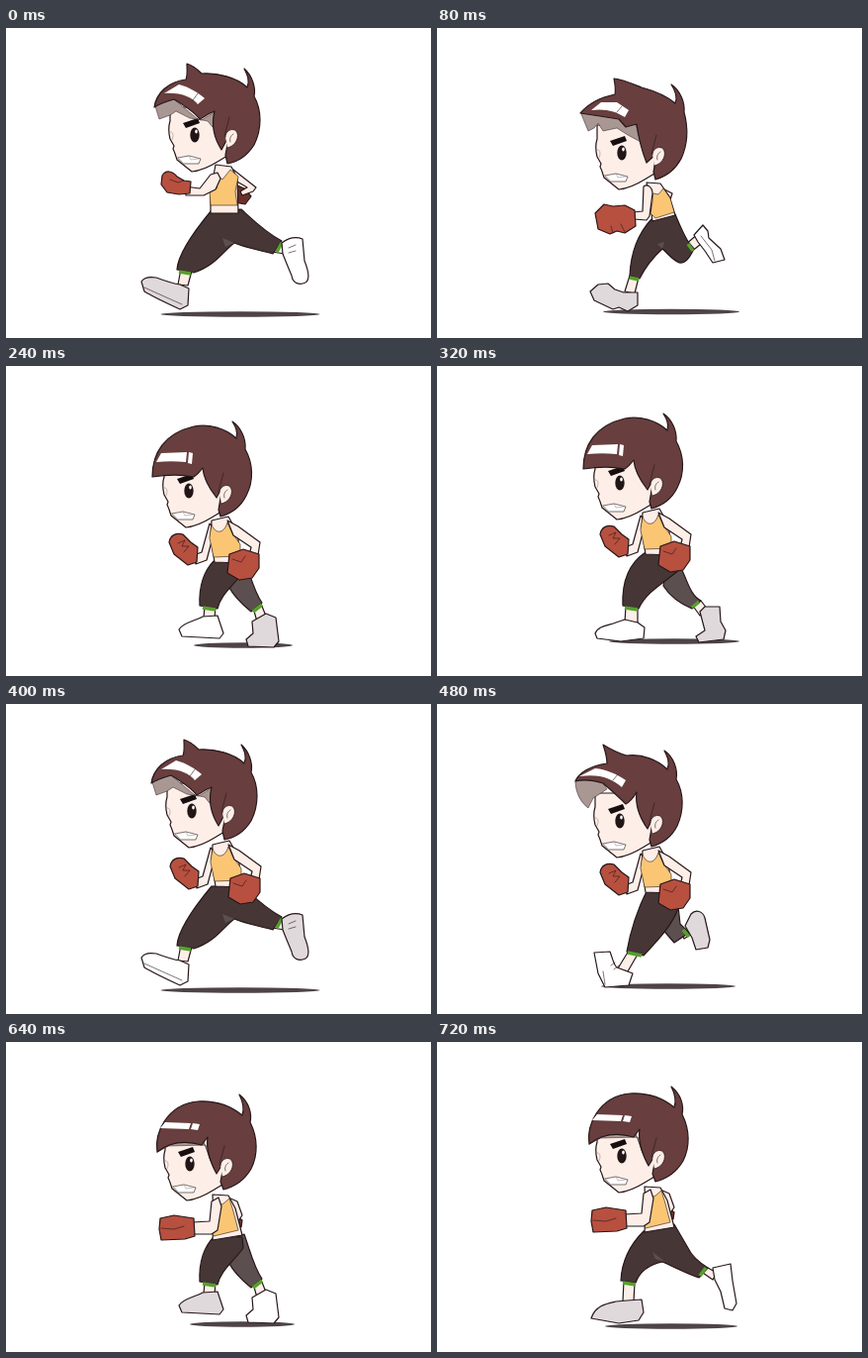
These frames come from a looping animation (430 px wide and 313 px high, 800 ms). An HTML page without scripts:

```html
<!DOCTYPE html>
<html lang="en">
<head>
<meta charset="utf-8">
<title>Running boxer</title>
<style>
html, body { margin: 0; width: 100%; height: 100%; overflow: hidden; background: #fff; }
svg { display: block; width: 100vw; height: 100vh; stroke: #27171a; stroke-width: 1.2; stroke-linejoin: round; stroke-linecap: round; }
.skin { fill: #fdefe8; }
.hair { fill: #683e3e; }
.under { fill: #a99793; stroke-width: .5; }
.band { fill: #fff; stroke: none; }
.top { fill: #fbc674; stroke-width: .6; }
.glove { fill: #b7503f; }
.shade { fill: #6b3029; }
.pants { fill: #463736; }
.dim { fill: #5c4f4f; }
.sock { fill: none; stroke: #57a02c; stroke-width: 3.5; stroke-linecap: butt; }
.near { fill: var(--near, #fff); }
.far { fill: var(--far, #e0d9dc); }
.line { fill: none; stroke-width: .6; }
.shadow { fill: #4e4448; stroke: none; }
.pose { visibility: hidden; animation: show 800ms step-end infinite; animation-delay: calc(var(--i) * 80ms - 800ms); }
.swap { --near: #e0d9dc; --far: #fff; }
@keyframes show {
  0% { visibility: visible; }
  10%, 100% { visibility: hidden; }
}
</style>
</head>
<body>
<svg viewBox="0 0 430 313">
<defs>
  <!-- Face parts, centred on the eye -->
  <g id="face">
    <path class="skin" d="M-25-28L-25-14C-27-8-26 0-25 4L-21 11L-22 14C-20 18-19 22-18 25L-3 37C7 36 15 32 23 27L33 21L34-28Z"/>
    <path class="line" d="M-25-3C-22-4-21 1-23 5" stroke="#9b8886"/>
    <ellipse rx="4.700" ry="7.600" fill="#211516" stroke="none"/>
    <ellipse cx="1.500" cy="-3.500" rx="1.300" ry="2" fill="#fff" stroke="none"/>
    <path d="M-12-12L3-17L5-12L-9-7Z" fill="#160e0f" stroke="none"/>
    <path d="M-17 23L-6 21L6 24L4 29L-11 29Z" fill="#fff" stroke-width=".6"/>
    <path class="line" d="M-6 21L-4 25L4 24" stroke="#9f9293"/>
  </g>
  <g id="ear">
    <path class="skin" d="M31 2C31-6 41-8 43-2C45 5 39 12 33 13" stroke-width=".8"/>
    <path class="line" d="M39-1C36 1 35 4 36 7M30 1L35-18"/>
  </g>

  <!-- Heads -->
  <g id="head-flap">
    <use href="#face" x="191" y="108"/>
    <path class="under" d="M151 79L155 92L166 88L172 84L186 91L198 93L212 84L209 100L204 94L194 92L170 72Z"/>
    <path class="hair" d="M150 80C152 66 164 54 182 52C184 47 183 42 183 36C190 38 194 42 198 46C214 45 234 50 244 60C247 53 244 47 241 41C249 48 253 60 251 69C259 83 259 102 251 118C244 129 236 135 224 137L222 128L226 108L218 123C211 112 207 100 211 84C203 87 199 91 196 92C190 84 180 78 170 72C163 74 156 76 150 80Z"/>
    <path class="band" d="M160 66L175 57C186 60 194 65 201 71L194 77C188 70 178 65 160 66Z"/>
    <path class="line" d="M194 66L189 73"/>
    <use href="#ear" x="191" y="108"/>
  </g>
  <g id="head-drop">
    <use href="#face" x="187" y="126"/>
    <path class="under" d="M146 87L153 104L159 101L163 96L168 104L182 101L193 108L206 115L200 94L160 86Z"/>
    <path class="hair" d="M145 86C154 75 166 70 180 67C181 62 180 56 179 51C188 52 197 56 207 60C222 64 234 70 241 76C244 69 241 63 237 57C246 63 251 75 250 85C254 100 254 117 247 132C241 143 232 150 221 153L219 145L223 126L212 136C208 126 204 112 202 97L191 100L184 92L165 89Z"/>
    <path class="band" d="M156 83L166 75L182 75L194 83L190 90C181 84 170 81 156 83Z"/>
    <path class="line" d="M187 79L182 85"/>
    <use href="#ear" x="187" y="126"/>
  </g>
  <g id="head-low">
    <use href="#face" x="185" y="135"/>
    <path class="under" d="M143 99L146 109L153 119L161 119L166 110L180 117L207 124L209 112L180 104Z"/>
    <path class="hair" d="M143 98C149 96 155 96 159 94L165 87C159 82 160 75 158 70C164 74 168 74 173 73C190 68 214 69 230 81C234 73 230 65 226 59C235 66 240 78 240 90C249 102 250 122 244 138C239 148 231 155 221 158L217 149L221 134L211 145C207 136 205 127 204 117C198 115 194 112 191 110C184 115 176 114 168 110L160 104L152 101Z"/>
    <path class="band" d="M155 97C163 95 170 101 188 99L185 104C178 106 172 110 165 104Z"/>
    <use href="#ear" x="185" y="135"/>
  </g>
  <g id="head-smooth">
    <use href="#face" x="185" y="118"/>
    <path class="hair" d="M148 104C148 80 160 60 190 53C206 50 222 55 233 65C235 58 232 53 229 48C238 54 243 66 242 76C250 90 251 108 243 123C237 135 228 141 217 144L215 137L219 114L213 125C206 116 200 107 199 95C196 99 193 102 190 104C176 101 160 102 148 104Z"/>
    <path class="band" d="M152 89L157 80L183 79L182 89C172 88 162 88 152 89ZM185 79L189 80L188 91L184 90Z"/>
    <use href="#ear" x="185" y="118"/>
  </g>
  <g id="head-lift">
    <use href="#face" x="185" y="118"/>
    <path class="under" d="M140 78C140 90 146 100 153 105L158 95L172 86L166 77Z"/>
    <path class="hair" d="M140 78C143 70 155 62 172 60C172 53 170 47 168 41C176 46 184 50 192 52C208 50 224 57 233 66C236 59 233 53 230 47C239 53 244 66 242 76C250 90 250 108 243 123C237 135 228 141 217 144L215 137L219 114L213 126C206 116 200 104 202 89C199 94 195 99 191 101C185 95 175 86 168 80C158 77 148 76 140 78Z"/>
    <path class="band" d="M144 73L160 65C172 66 182 71 191 77L187 84C177 75 164 70 144 73Z"/>
    <path class="line" d="M183 71L178 77"/>
    <use href="#ear" x="185" y="118"/>
  </g>
  <g id="head-round">
    <use href="#face" x="187" y="115"/>
    <path class="under" d="M154 103L162 95L200 90L208 112L203 96L166 97Z"/>
    <path class="hair" d="M154 103C151 85 163 55 195 52C212 51 228 56 240 66C243 58 240 51 237 45C247 53 250 64 248 73C256 89 256 106 249 120C242 132 233 138 221 141L218 133L222 112L214 125C208 114 203 102 205 88L199 96C185 92 168 92 154 103Z"/>
    <path class="band" d="M157 79L162 73L188 74L186 80ZM190 74L197 75L195 81L188 80Z"/>
    <use href="#ear" x="187" y="115"/>
  </g>

  <!-- Upper bodies -->
  <g id="torso-stride">
    <path class="shade" d="M232 158L241 162L248 170L242 178L231 176Z"/>
    <path class="skin" d="M230 143L253 161L250 165L239 169L237 165L244 161L232 154Z"/>
    <path class="skin" d="M212 138L228 140L234 152L235 187L207 187L207 165Z"/>
    <path class="top" d="M214 149L219 153L227 143L235 150L232 165L234 179L207 179L206 166L213 162Z"/>
    <path class="skin" d="M181 160L196 162L207 148L214 146L217 152L212 163L200 169L182 169Z"/>
    <path class="glove" d="M158 149C162 143 168 144 173 150L180 154L187 155L186 167L175 168L163 166L157 158Z"/>
    <path class="line" d="M166 153L174 156L180 154"/>
  </g>
  <g id="torso-swing">
    <path class="skin" d="M226 161L238 167L233 183L229 177Z"/>
    <path class="skin" d="M212 156L226 157L235 170L241 189L218 195L216 180Z"/>
    <path class="top" d="M219 167L224 168L229 162L236 172L240 186L221 192L216 187L218 176Z"/>
    <path class="skin" d="M209 160C213 157 218 161 218 167L215 190L212 194L199 193L199 186L208 185Z"/>
    <path class="glove" d="M160 187L169 178L178 180L190 179L200 184L201 200L190 207L182 205L175 208L163 203Z"/>
    <path class="line" d="M178 207L176 200M190 206L186 198"/>
  </g>
  <g id="torso-tuck">
    <path class="skin" d="M207 166L212 163L228 163L240 193L243 200L217 207L211 188Z"/>
    <path class="top" d="M207 165L214 168L228 164L236 171L242 194L232 199L216 188L208 182Z"/>
    <path class="glove" d="M186 188L190 184L203 185L208 190L205 204L191 207Z"/>
    <path class="skin" d="M213 167C219 160 228 162 231 171L235 188L240 193L237 198L215 198L212 191L222 187Z"/>
    <path class="glove" d="M195 197L206 191L215 195L227 203L227 211L217 219L206 222L199 216Z"/>
    <path class="line" d="M199 205L210 207L215 204M206 214L213 211"/>
  </g>
  <g id="torso-guard">
    <path class="skin" d="M206 151L211 158L203 188L192 192L190 183L198 180Z"/>
    <path class="glove" d="M165 170C166 163 172 160 179 162L187 170L194 175L193 190L184 193L170 182Z"/>
    <path class="line" d="M174 171L181 168L178 174L185 174L180 180"/>
    <path class="skin" d="M208 148L225 144L234 160L238 191L211 190L207 165Z"/>
    <path class="top" d="M208 152C211 161 220 163 224 150L229 161L237 172L237 184L210 185L206 166Z"/>
    <path class="skin" d="M224 148L235 154L257 170L255 183L246 183L248 175L230 163Z"/>
    <path class="glove" d="M226 182L240 177L256 182L256 196L249 206L236 208L224 201Z"/>
    <path class="line" d="M229 187L238 190L242 184"/>
  </g>
  <g id="torso-punch">
    <path class="shade" d="M232 166L240 172L239 179L232 177Z"/>
    <path class="skin" d="M226 149L235 153L240 167L235 174L228 164Z"/>
    <path class="skin" d="M210 146L226 147L233 160L240 187L210 192L211 170Z"/>
    <path class="top" d="M213 154L220 156L227 150L231 163L236 182L211 188L208 180L213 168Z"/>
    <path class="skin" d="M190 174L207 173L209 153L216 149L219 158L215 182L209 186L190 186Z"/>
    <path class="glove" d="M157 170L171 167L191 170L192 188L182 191L158 192L156 181Z"/>
    <path class="line" d="M158 180L171 181L181 178"/>
  </g>

  <!-- Legs -->
  <g id="legs-stride">
    <path class="skin" d="M177 243L188 245L184 260L174 259ZM272 217L285 219L282 228L269 226Z"/>
    <path class="pants" d="M208 184L238 183C250 194 262 206 279 215L270 228C255 224 240 221 231 217C220 225 212 240 190 247L173 244C174 228 193 202 208 184Z"/>
    <path class="dim" d="M219 212L231 217L222 221Z" stroke="none"/>
    <path class="sock" d="M175 246L187 248M279 217L274 226"/>
    <path class="far" d="M137 256C140 251 146 251 152 252C160 255 168 258 176 259L185 263L184 280L176 284C163 278 148 271 140 266Z"/>
    <path class="near" d="M279 217C287 211 295 211 300 213L302 235C306 245 308 254 303 257C297 260 290 258 289 250L284 238L280 228Z"/>
    <path class="line" d="M140 262L160 271L178 279M286 222L293 219M286 227L293 225"/>
  </g>
  <g id="legs-swing">
    <path class="skin" d="M195 250L204 252L200 268L190 266ZM251 219L265 207L271 215L257 226Z"/>
    <path class="pants" d="M217 193L241 188C246 200 250 210 255 217L260 223C256 231 252 238 245 237C238 234 233 227 228 223C217 233 210 243 205 253L195 250C196 228 203 208 217 193Z"/>
    <path class="dim" d="M223 218L230 216L228 223Z" stroke="none"/>
    <path class="sock" d="M195 252L204 254M254 218L259 225"/>
    <path class="near" d="M260 209L269 199L274 205L275 212L287 223L291 234L279 237L271 225L264 216Z"/>
    <path class="line" d="M267 210L278 224L281 235"/>
    <path class="far" d="M155 266L163 259L173 258L180 264L189 267L203 267L203 280L193 286L184 282L178 284L159 275Z"/>
  </g>
  <g id="legs-pass">
    <path class="skin" d="M216 251L225 248L230 264L220 264ZM237 246L246 243L251 259L243 257Z"/>
    <path class="pants" d="M222 203L244 195C248 212 246 226 240 233L246 244L237 250L222 233Z"/>
    <path class="pants" d="M214 207L232 211C228 222 223 232 220 239L226 248L217 255L207 245C201 238 204 222 214 207Z"/>
    <path class="sock" d="M217 254L226 249M238 249L246 243"/>
    <path class="far" d="M201 277L207 269L217 265L222 260L236 262L241 273L242 282L230 284L202 283Z"/>
    <path class="near" d="M247 247L250 244L264 245L265 262C264 274 260 282 252 284C246 284 244 279 246 273L250 262Z"/>
    <path class="line" d="M204 279L239 278M261 248L260 265L252 279"/>
  </g>
  <g id="legs-reach">
    <path class="skin" d="M201 242L212 243L211 255L200 254ZM250 244L258 240L264 255L254 258Z"/>
    <path class="dim" d="M226 200L241 194C248 214 251 228 259 239L248 248C238 240 230 232 225 222Z"/>
    <path class="pants" d="M211 196L239 197L240 208C230 222 217 231 214 245L196 242C195 222 201 206 211 196Z"/>
    <path class="sock" d="M199 244L212 246M250 248L259 241"/>
    <path class="far" d="M249 258L263 250L273 254L276 278L271 284L245 283L243 276L250 270Z"/>
    <path class="near" d="M175 266C179 259 190 258 199 253L214 252L220 270L216 275L178 273Z"/>
  </g>
  <g id="legs-step">
    <path class="skin" d="M191 242L203 243L203 259L190 259ZM258 241L267 237L274 246L266 252Z"/>
    <path class="dim" d="M232 200L246 202C254 218 256 231 267 237L258 245C246 240 236 233 229 222Z"/>
    <path class="pants" d="M211 188L238 189L247 204C232 218 213 226 204 245L188 242C187 220 193 200 211 188Z"/>
    <path class="sock" d="M190 244L203 246M258 244L265 238"/>
    <path class="far" d="M266 248L271 243L286 243L287 258L292 267L290 276L265 279L262 273L271 267Z"/>
    <path class="near" d="M160 270C163 262 174 262 181 259L190 256L203 259L210 264L209 275L186 278L162 275Z"/>
  </g>
  <g id="legs-kick">
    <path class="skin" d="M194 249L204 251L193 270L183 267ZM246 230L256 225L259 231L250 237Z"/>
    <path class="dim" d="M238 204L244 204L246 222L255 231L240 241L227 226Z"/>
    <path class="pants" d="M213 187L240 189L244 206C238 224 222 240 209 254L192 250C196 228 204 205 213 187Z"/>
    <path class="sock" d="M193 251L207 254M249 228L255 235"/>
    <path class="far" d="M251 224L257 212C262 207 269 209 271 216L276 238L274 246L262 248L258 236Z"/>
    <path class="near" d="M159 251L175 250C178 258 179 264 182 266L198 272L194 284L170 286L163 272Z"/>
    <path class="line" d="M170 283L168 270M176 264L180 261M179 268L184 264"/>
  </g>
  <g id="legs-bend">
    <path class="far" d="M235 240L255 243L252 267L236 266L232 256Z"/>
    <path class="line" d="M239 243L235 256M250 246L244 264"/>
    <path class="skin" d="M227 256L234 252L243 266L235 271Z"/>
    <path class="pants" d="M216 207L245 197C249 215 240 230 226 237L234 250L225 258L206 236C201 228 207 215 216 207Z"/>
    <path class="dim" d="M214 210L217 213L206 231C204 224 208 216 214 210Z" stroke="none"/>
    <path class="sock" d="M227 258L234 253"/>
    <path class="near" d="M208 281C212 271 223 272 231 268L245 266L254 277L253 282C240 284 222 284 208 281Z"/>
  </g>
  <g id="legs-lunge">
    <path class="skin" d="M189 241L200 243L199 262L188 262ZM266 231L274 228L283 233L279 240Z"/>
    <path class="pants" d="M209 191L240 184L254 208C258 217 266 223 274 228L265 238C248 232 236 225 228 222C214 225 205 232 201 243L186 241C187 220 195 205 209 191Z"/>
    <path class="dim" d="M218 212L231 222L221 219Z" stroke="none"/>
    <path class="sock" d="M188 243L201 245M266 236L272 228"/>
    <path class="far" d="M156 279C160 266 172 264 181 262L192 261L207 260L209 273L204 281L184 284Z"/>
    <path class="near" d="M279 228L297 224L299 241L303 264L299 271L291 269L287 252L281 240Z"/>
  </g>
</defs>

<g class="pose" style="--i:0">
  <ellipse class="shadow" cx="237" cy="289" rx="80.500" ry="2.800"/>
  <use href="#legs-stride"/><use href="#torso-stride"/><use href="#head-flap"/>
</g>
<g class="pose" style="--i:1">
  <ellipse class="shadow" cx="237" cy="286.500" rx="69" ry="2.800"/>
  <use href="#legs-swing"/><use href="#torso-swing"/><use href="#head-drop"/>
</g>
<g class="pose" style="--i:2">
  <ellipse class="shadow" cx="239" cy="285" rx="38.500" ry="2.800"/>
  <use href="#legs-pass"/><use href="#head-low"/><use href="#torso-tuck"/>
</g>
<g class="pose" style="--i:3">
  <ellipse class="shadow" cx="240" cy="282" rx="50" ry="2.800"/>
  <use href="#legs-reach"/><use href="#torso-guard" y="8"/><use href="#head-smooth" y="8"/>
</g>
<g class="pose" style="--i:4">
  <ellipse class="shadow" cx="240" cy="278" rx="66" ry="2.800"/>
  <use href="#legs-step"/><use href="#torso-guard"/><use href="#head-smooth"/>
</g>
<g class="pose swap" style="--i:5">
  <ellipse class="shadow" cx="237" cy="289" rx="80.500" ry="2.800"/>
  <use href="#legs-stride"/><use href="#torso-guard" x="1" y="-6"/><use href="#head-flap" x="-3"/>
</g>
<g class="pose" style="--i:6">
  <ellipse class="shadow" cx="234" cy="285" rx="68" ry="2.800"/>
  <use href="#legs-kick"/><use href="#torso-guard"/><use href="#head-lift"/>
</g>
<g class="pose" style="--i:7">
  <ellipse class="shadow" cx="240" cy="283" rx="40" ry="2.800"/>
  <use href="#legs-bend"/><use href="#head-low"/><use href="#torso-tuck"/>
</g>
<g class="pose swap" style="--i:8">
  <ellipse class="shadow" cx="239" cy="285" rx="53" ry="2.800"/>
  <use href="#legs-reach"/><use href="#torso-punch" x="-1" y="8"/><use href="#head-round" x="-1" y="8"/>
</g>
<g class="pose" style="--i:9">
  <ellipse class="shadow" cx="237" cy="287" rx="67" ry="2.800"/>
  <use href="#legs-lunge"/><use href="#torso-punch"/><use href="#head-round"/>
</g>
</svg>
</body>
</html>
```
